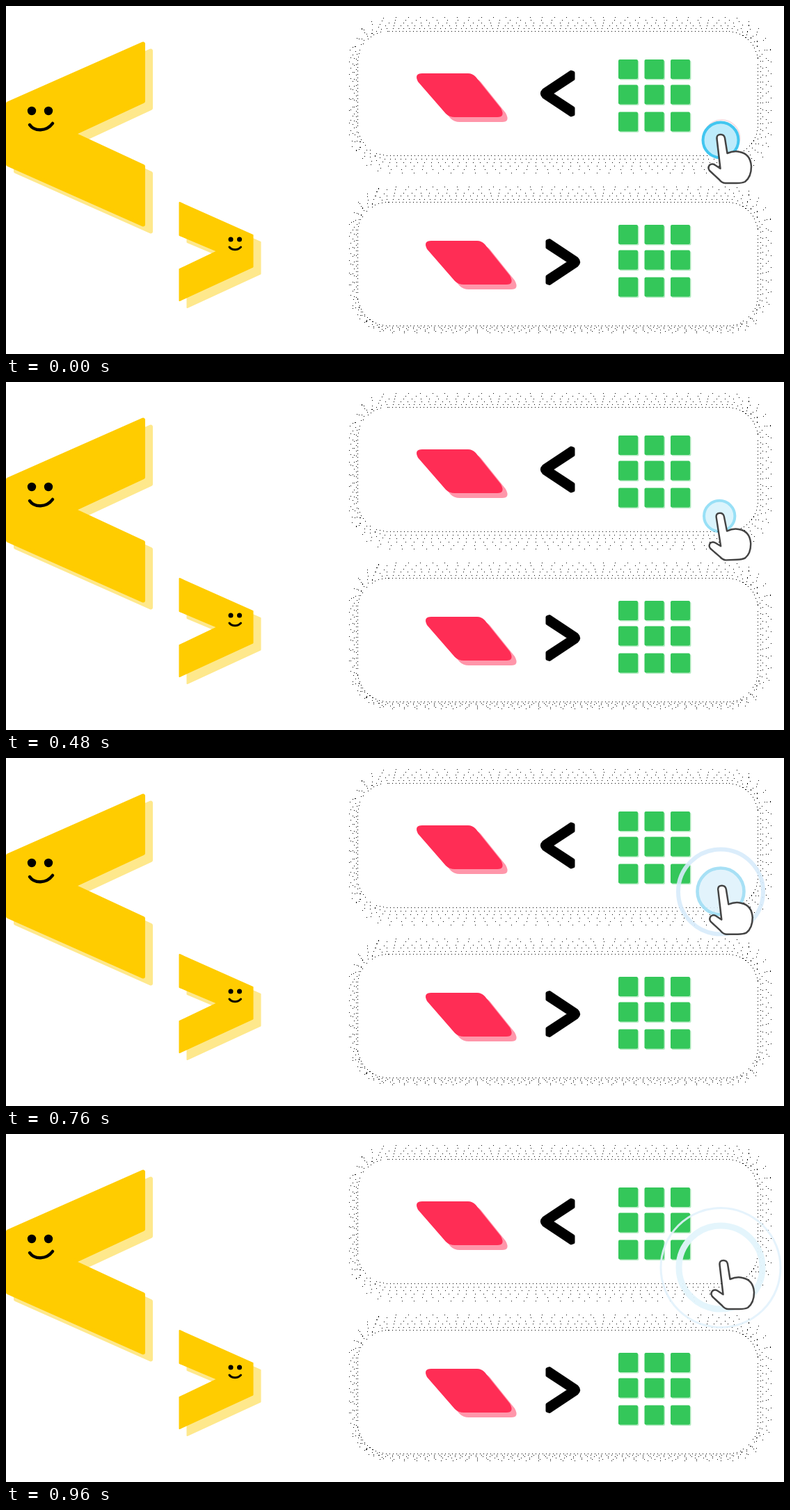
Write an HTML page that moves like this. It is 1118 px wide and 501 px high and loops after 1 s.

```html
<!DOCTYPE html>
<html lang="en">
<head>
<meta charset="utf-8">
<title>Compare</title>
<style>
  html, body { margin: 0; width: 100%; height: 100%; overflow: hidden; background: #fff; }
  svg { display: block; }
</style>
</head>
<body>
<svg width="1118" height="501" viewBox="0 0 1118 501" fill="none">
  <defs>
    <path id="big" stroke-width="6" stroke-linejoin="round"
      d="M197 54.500V137L96 184L197 231V314.500L3 228V140.500Z"/>
    <path id="small" stroke-width="2" stroke-linejoin="round"
      d="M249.500 283L354.500 330V375.500L249.500 424V379L304 353L249.500 330Z"/>
    <path id="slant"
      d="M598 97H664Q670 97 675 102L711 147Q718 160 706 160H645Q637 160 632 155L592 109Q586 97 598 97Z"/>
    <path id="chevron" fill="#000" stroke="#000" stroke-width="5" stroke-linejoin="round"
      d="M812 95L815 96V105L783 126L815 147V156L812 157L773 131Q768 126 773 121Z"/>
    <g id="tiles"></g>
  </defs>

  <g id="halo" stroke="#000" shape-rendering="crispEdges"></g>

  <use href="#big" x="11" y="10" fill="#fee88c" stroke="#fee88c"/>
  <use href="#big" fill="#fc0" stroke="#fc0"/>
  <use href="#small" x="11" y="10" fill="#fee88c" stroke="#fee88c"/>
  <use href="#small" fill="#fc0" stroke="#fc0"/>
  <g fill="#000">
    <circle cx="37" cy="151" r="6.2"/><circle cx="61" cy="151" r="6.2"/>
    <circle cx="323" cy="336" r="3.5"/><circle cx="335.500" cy="336" r="3.5"/>
  </g>
  <g stroke="#000" stroke-linecap="round">
    <path stroke-width="4.500" d="M34 171C41 181 58 181 67 169"/>
    <path stroke-width="3" d="M321 347C325 352 333 352 337.500 347"/>
  </g>

  <use href="#slant" x="7" y="7" fill="#ff96aa"/>
  <use href="#slant" fill="#ff2d55"/>
  <use href="#slant" x="20" y="248" fill="#ff96aa"/>
  <use href="#slant" x="13" y="241" fill="#ff2d55"/>
  <use href="#chevron"/>
  <use href="#chevron" transform="translate(1593 242.500) scale(-1 1)"/>
  <use href="#tiles"/>
  <use href="#tiles" y="238"/>

  <circle id="ghost" cx="1028.500" cy="190" r="26" stroke="#f9dfe2" stroke-width="2"/>
  <circle id="disc" cy="193" fill="#bdebfb" stroke="#42c6f0" stroke-width="4"/>
  <circle id="outer" cx="1027" cy="192.500"/>
  <circle id="inner" cx="1027" cy="192"/>
  <path id="hand" fill="#fff" stroke="#444" stroke-width="2.500" stroke-linejoin="round"
    d="M1021.500 191Q1021 185 1027 185Q1032 185 1033 190L1036.500 212Q1046 208 1054 210Q1070 213 1071 231Q1071 246 1062 253Q1058 255 1050 255H1034Q1029 255 1025 250L1011 237Q1008 233 1011 229Q1015 226 1019 229L1026.500 234Z"/>
</svg>
<script>
const $ = id => document.getElementById(id);

function set(el, attrs) {
  for (const name in attrs) el.setAttribute(name, attrs[name]);
}

function add(parent, name, attrs) {
  const el = document.createElementNS('http://www.w3.org/2000/svg', name);
  set(el, attrs);
  parent.append(el);
}

for (const [dx, dy, fill] of [[1.5, 1.5, '#b5ebc2'], [0, 0, '#34c75a']])
  for (const y of [77, 113.5, 152.5])
    for (const x of [880, 917.5, 955])
      add($('tiles'), 'rect', { x: x + dx, y: y + dy, width: 28, height: 28, rx: 2, fill });

// Dotted outlines that thin out away from each card
function halo(top, height, up, down) {
  for (let i = 0; i < 6; i++)
    add($('halo'), 'rect', {
      x: Math.round(505 - 2.5 * i) + .5, y: Math.round(top - up * i) + .5,
      width: Math.round(575 + 6.2 * i), height: Math.round(height + (up + down) * i),
      rx: 44 + 3 * i, 'stroke-dasharray': `1 ${4 + 2.5 * i}`, 'stroke-dashoffset': 2 * i
    });
}
halo(36, 179, 4, 5);
halo(282, 178, 4.4, 2);

// Linear interpolation through [time, value] pairs
function key(t, ...points) {
  const i = points.findIndex(p => p[0] >= t);
  if (i < 0) return points.at(-1)[1];
  if (i === 0) return points[0][1];
  const [t0, a] = points[i - 1], [t1, b] = points[i];
  return a + (b - a) * (t - t0) / (t1 - t0);
}

function draw(t) {
  const rippling = t >= 640;
  const press = key(t, [0, 0], [160, .48], [400, 1], [600, 0]);

  set($('ghost'), { opacity: Math.max(0, 1 - t / 400) });
  set($('disc'), {
    cx: 1027 - 3 * press, r: 25.5 - 6.5 * Math.min(t / 600, 1) ** 3,
    opacity: rippling ? 0 : key(t, [0, 1], [400, .82], [600, .12])
  });
  set($('outer'), {
    r: key(t, [640, 36], [680, 47], [760, 61], [840, 73.5], [960, 86]),
    stroke: `hsl(204 80% ${key(t, [640, 90], [840, 92], [960, 94])}%)`,
    'stroke-width': key(t, [640, 6], [760, 6], [840, 5], [960, 3]),
    opacity: rippling ? .9 : 0
  });
  set($('inner'), {
    r: key(t, [640, 20], [760, 33.5], [840, 44.5], [960, 60]),
    stroke: `hsl(196 80% ${key(t, [640, 70], [760, 80], [840, 86], [960, 94])}%)`,
    'stroke-width': key(t, [640, 4], [840, 5], [960, 9]),
    fill: '#dff2fc',
    'fill-opacity': key(t, [640, 1], [760, .95], [840, .3], [960, 0]),
    opacity: rippling ? .95 : 0
  });

  const drift = key(t, [600, 0], [960, 1]);
  set($('hand'), {
    transform: `translate(${1072 + 4 * drift} ${255 - 3 * drift}) rotate(${-3.6 * press}) ` +
      `scale(${1 - .05 * press}) translate(-1072 -255)`
  });
}

function frame() {
  const t = Math.floor(performance.now() % 1000 / 40) * 40;
  draw(t < 80 ? 0 : t);
  requestAnimationFrame(frame);
}
frame();
</script>
</body>
</html>
```
